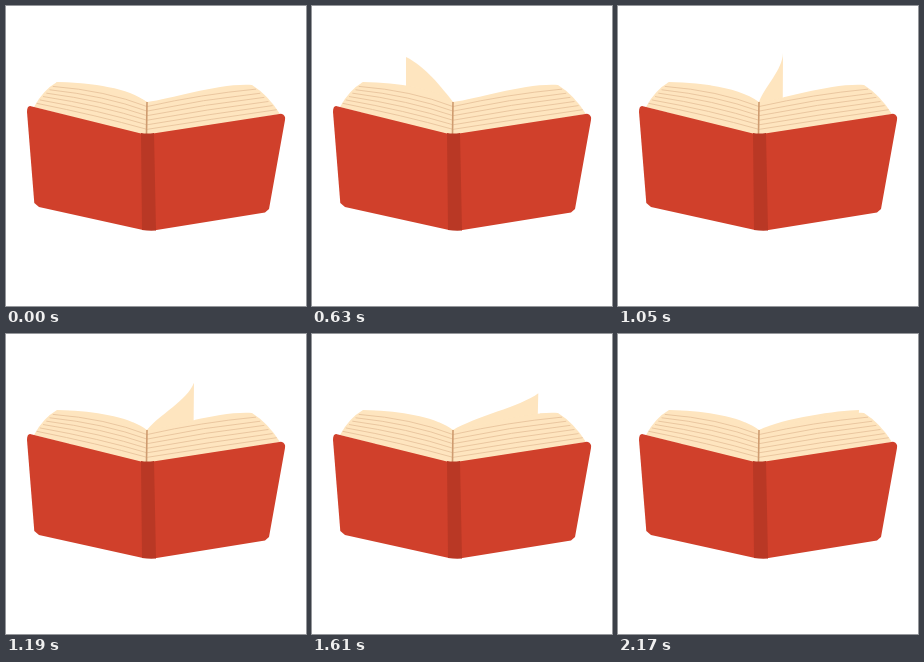
Write an HTML page that moves like this. It is 300 by 300 pixels and loops after 3.08 s.

```html
<!DOCTYPE html>
<html lang="en">
<head>
<meta charset="utf-8">
<title>Book with a turning page</title>
<style>
html, body { margin: 0; width: 100%; height: 100%; overflow: hidden; background: #fff; }
svg { display: block; width: 100%; height: 100%; }
</style>
</head>
<body>
<svg viewBox="0 0 300 300">
  <path id="page" fill="#fee5bf"/>
  <path fill="#fee5bf" d="M28 101Q37 84 51 76C88 77 122 82 141 96C166 93 213 77 246 79Q262 89 274 108L149 129H136Z"/>
  <path id="lines" fill="none" stroke="#e8c39c" stroke-width=".9"/>
  <path fill="none" stroke="#cf9c70" stroke-width="1.6" d="M141 96L140.500 128"/>
  <g fill="#d0402b">
    <path d="M24 100L137 128V224L33 201L28.300 197L21 106Q21 100 24 100Z"/>
    <path d="M147 127.500L275 107.800Q280 109 279 114L263 203L259 206.500L149 224.300Z"/>
  </g>
  <path fill="#b93825" d="M135 127Q141 128 148 127L150 224.500Q143 225 136 224Z"/>
</svg>
<script>
const LOOP = 3080, STEP = 70, END = 2170;
const SPINE = 141, FOLD = 96, REST = 76.5;

// Where the tip of the page is: [time, x, y]
const tips = [
  [0, 50, REST], [280, 64, 63], [630, 94, 51], [840, 128, 43],
  [1050, 165, 47], [1400, 216, 52], [1820, 231, 67], [END, 241, 76]
];

const slope = (i, k) => {
  const a = tips[Math.max(i - 1, 0)], b = tips[Math.min(i + 1, tips.length - 1)];
  return (b[k] - a[k]) / (b[0] - a[0]);
};

// Smooth path through the tips
function tipAt(t) {
  let i = 0;
  while (i < tips.length - 2 && t >= tips[i + 1][0]) i++;
  const a = tips[i], b = tips[i + 1], span = b[0] - a[0];
  const u = (t - a[0]) / span, v = 1 - u;
  return [1, 2].map(k =>
    v * v * (1 + 2 * u) * a[k] + u * u * (3 - 2 * u) * b[k] +
    span * u * v * (v * slope(i, k) - u * slope(i + 1, k)));
}

// The page bends with its side (-1 left, 1 right) and with its lift
function pagePath([x, y]) {
  const side = (x - SPINE) / 100, lift = REST - y;
  const ax = x + 6 - 27 * side, ay = REST - lift * (0.5 - 0.3 * side);
  const bx = SPINE + 25 * side, by = FOLD - 16 + 4 * side * side;
  return `M${x} ${y}C${ax} ${ay} ${bx} ${by} ${SPINE} ${FOLD}V110L${x - Math.max(side, 0)} 95Z`;
}

// Sheet edges: curved near the top, straighter towards the cover
let sheets = '';
for (let i = 1; i <= 6; i++) {
  const f = i / 6.8, y = FOLD + 31 * f, bend = 7 * (1 - f);
  const lx = 50 - 22 * f, ly = 77 + 23 * f, rx = 246 + 28 * f, ry = 79 + 28 * f;
  sheets += `M${lx} ${ly}Q${(lx + SPINE) / 2 + 6} ${(ly + y) / 2 - bend} ${SPINE} ${y}`;
  sheets += `Q${(rx + SPINE) / 2} ${(ry + y) / 2 - bend * 0.6} ${rx} ${ry}`;
}
document.getElementById('lines').setAttribute('d', sheets);

const page = document.getElementById('page');
const start = performance.now();
function tick() {
  const now = (performance.now() - start) % LOOP;
  const t = Math.min(Math.floor(now / STEP) * STEP, END);
  page.setAttribute('d', pagePath(tipAt(t)));
  requestAnimationFrame(tick);
}
tick();
</script>
</body>
</html>
```
